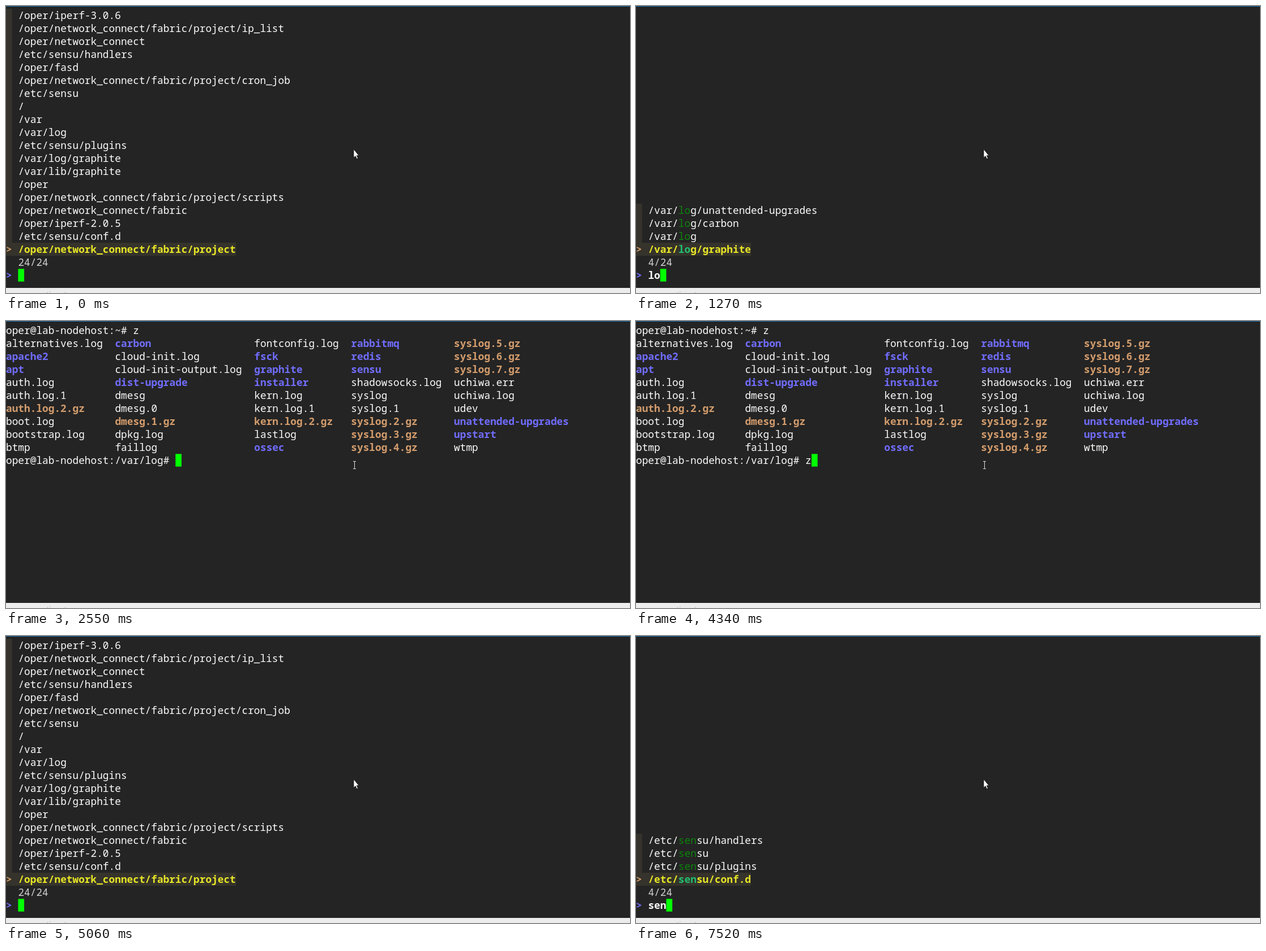
An HTML page with a canvas for the animation above (8 s loop, 1102 px wide and 508 px high).

```html
<!DOCTYPE html>
<html lang="en">
<head>
<meta charset="utf-8">
<title>Directory jump</title>
<style>
html, body { margin: 0; width: 100%; height: 100%; overflow: hidden; background: #242424; }
canvas { display: block; }
</style>
</head>
<body>
<canvas id="stage" width="1102" height="508"></canvas>
<script>
const ctx = document.getElementById('stage').getContext('2d');
const LOOP = 8000, TOP = 5, ROW = 23, COL = 10.69, LAST = 18;
const WHITE = '#fcfcfc', BLUE = '#716dff', TAN = '#d39c6c', BAND = '#35332b';
const GREEN = '#0b850b', YELLOW = '#e8e626', MINT = '#20c070';

const project = '/oper/network_connect/fabric/project';
const dirs = [
  '/tmp', '/home', '/var/log/unattended-upgrades', '/oper/.proxychains', '/var/log/carbon',
  '/oper/iperf-3.0.6', project + '/ip_list', '/oper/network_connect', '/etc/sensu/handlers',
  '/oper/fasd', project + '/cron_job', '/etc/sensu', '/', '/var', '/var/log',
  '/etc/sensu/plugins', '/var/log/graphite', '/var/lib/graphite', '/oper',
  project + '/scripts', '/oper/network_connect/fabric', '/oper/iperf-2.0.5',
  '/etc/sensu/conf.d', project
];

// Start column and file names; a trailing slash marks a directory.
const listing = [
  [0, 'alternatives.log apache2/ apt/ auth.log auth.log.1 auth.log.2.gz boot.log bootstrap.log btmp'],
  [18, 'carbon/ cloud-init.log cloud-init-output.log dist-upgrade/ dmesg dmesg.0 dmesg.1.gz dpkg.log faillog'],
  [41, 'fontconfig.log fsck/ graphite/ installer/ kern.log kern.log.1 kern.log.2.gz lastlog ossec/'],
  [57, 'rabbitmq/ redis/ sensu/ shadowsocks.log syslog syslog.1 syslog.2.gz syslog.3.gz syslog.4.gz'],
  [74, 'syslog.5.gz syslog.6.gz syslog.7.gz uchiwa.err uchiwa.log udev unattended-upgrades/ upstart/ wtmp']
];

function rect(x, y, w, h, color) {
  ctx.fillStyle = color;
  ctx.fillRect(x, y, w, h);
}

function text(s, col, row, color = WHITE, bold = false) {
  ctx.font = `${bold ? 700 : 500} 17.81px "Noto Sans Mono", "DejaVu Sans Mono", monospace`;
  ctx.fillStyle = color;
  ctx.fillText(s, col * COL, TOP + row * ROW + 18);
}

function block(col, row) {
  rect(col * COL, TOP + row * ROW + 0.3, COL, ROW - 0.6, '#00ff00');
}

function prompt(query) {
  text('>', 0, 20, BLUE, true);
  text(query, 2, 20, WHITE, true);
  block(2 + query.length, 20);
}

function entry(path, query, row, selected) {
  const width = selected ? (path.length + 2) * COL : COL;
  rect(0, TOP + row * ROW, width, ROW, BAND);
  if (selected) text('>', 0, row, TAN, true);
  const at = path.indexOf(query), end = at + query.length;
  const color = selected ? YELLOW : WHITE;
  text(path.slice(0, at), 2, row, color, selected);
  text(query, 2 + at, row, selected ? MINT : GREEN, selected);
  text(path.slice(end), 2 + end, row, color, selected);
}

function finder(query, up = 0) {
  const found = dirs.filter(d => d.includes(query));
  found.slice(-LAST - 1).reverse().forEach((d, i) => entry(d, query, LAST - i, i === up));
  text(found.length + '/' + dirs.length, 2, 19, '#d0d0d0');
  prompt(query);
  arrow();
}

function shell(listed, typed = '') {
  text('oper@lab-nodehost:~# z', 0, 0);
  if (!listed) return block(22, 0);
  for (const [col, names] of listing) {
    names.split(' ').forEach((name, i) => {
      const dir = name.endsWith('/'), zipped = name.endsWith('.gz');
      text(name.replace('/', ''), col, i + 1, dir ? BLUE : zipped ? TAN : WHITE, dir || zipped);
    });
  }
  const line = 'oper@lab-nodehost:/var/log# ' + typed;
  text(line, 0, 10);
  block(line.length, 10);
  beam();
}

function arrow() {
  const p = new Path2D('M614 253.5v15l3.2-2.9 2.2 5 2.2-1-2.2-4.8h3.8z');
  ctx.fillStyle = '#fff';
  ctx.strokeStyle = '#111';
  ctx.lineWidth = 0.8;
  ctx.fill(p);
  ctx.stroke(p);
}

function beam() {
  rect(615, 249, 1, 12, '#ddd');
  rect(613, 248, 5, 1, '#ddd');
  rect(613, 261, 5, 1, '#ddd');
}

const scenes = [
  [0, () => finder('')],
  [1120, () => finder('l')],
  [1270, () => finder('lo')],
  [2050, () => finder('lo', 1)],
  [2510, () => shell(false)],
  [2550, () => shell(true)],
  [4340, () => shell(true, 'z')],
  [5020, () => { prompt(''); arrow(); }],
  [5060, () => finder('')],
  [7070, () => finder('s')],
  [7270, () => finder('se')],
  [7520, () => finder('sen')]
];

function frame(now) {
  const t = now % LOOP;
  rect(0, 0, 1102, 508, '#242424');
  rect(0, 0, 1102, 1, '#1673b5');
  scenes.findLast(([start]) => start <= t)[1]();
  rect(0, 499, 1102, 9, '#ececec');
  ctx.font = '12px "Noto Sans", sans-serif';
  ctx.fillStyle = '#999';
  ctx.fillText('save connections to', 3, 515);
  requestAnimationFrame(frame);
}
requestAnimationFrame(frame);
</script>
</body>
</html>
```
